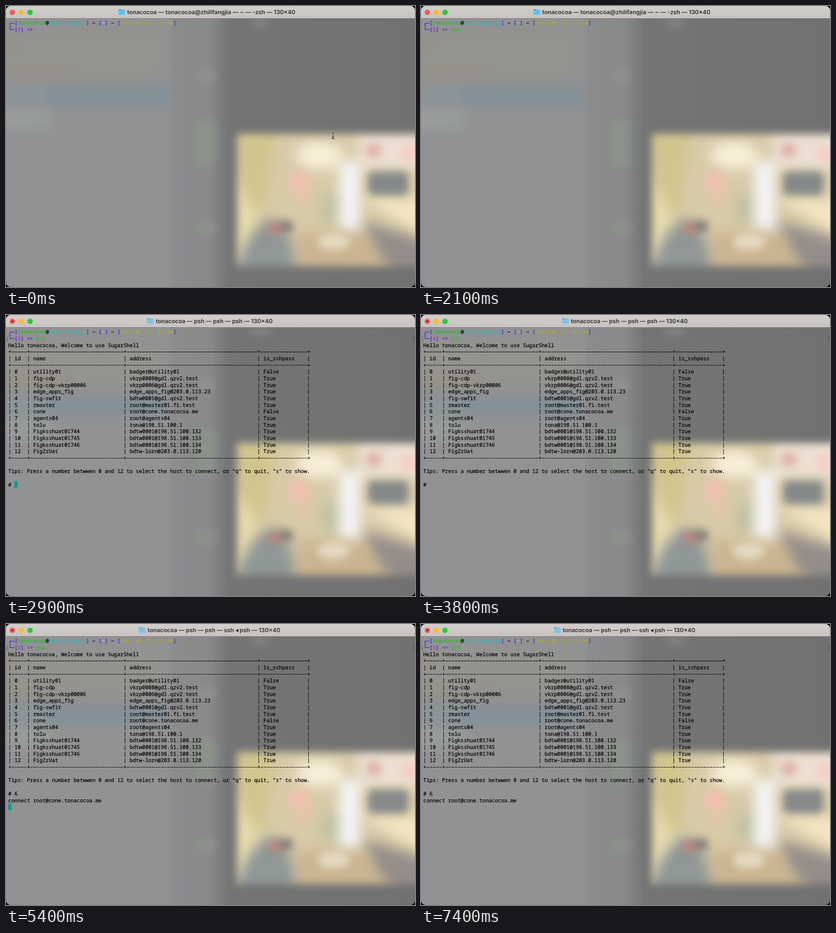
Write an HTML page that moves like this. It is 901 px wide and 621 px high and loops after 8 s.

```html
<!DOCTYPE html>
<html lang="en">
<head>
<meta charset="utf-8">
<title>Terminal</title>
<style>
  html, body { margin: 0; width: 100%; height: 100%; overflow: hidden; background: #000; }
  svg { display: block; }
  text { font: 500 11.43px "Noto Sans Mono", monospace; white-space: pre; text-rendering: geometricPrecision; }
  .regular { stroke: currentColor; stroke-width: .25px; }
  .bold { font-weight: 700; }
  #title { font: 600 12.75px Inter, sans-serif; fill: #302d2c; }
  .soft { filter: url(#soft); }
  .wide { filter: url(#wide); }
</style>
</head>
<body>
<svg width="901" height="621" viewBox="0 0 901 621">
  <defs>
    <filter id="soft" x="-60%" y="-60%" width="220%" height="220%" color-interpolation-filters="sRGB"><feGaussianBlur stdDeviation="9"/></filter>
    <filter id="wide" x="-50%" y="-50%" width="200%" height="200%" color-interpolation-filters="sRGB"><feGaussianBlur stdDeviation="14"/></filter>
    <linearGradient id="desk">
      <stop offset="0" stop-color="#919294"/><stop offset=".395" stop-color="#919294"/>
      <stop offset=".41" stop-color="#8b8c8e"/><stop offset=".5" stop-color="#88898a"/>
      <stop offset=".545" stop-color="#747474"/><stop offset="1" stop-color="#717171"/>
    </linearGradient>
    <linearGradient id="bar" x2="0" y2="1"><stop stop-color="#d3cecc"/><stop offset="1" stop-color="#c8c3c1"/></linearGradient>
    <clipPath id="window"><rect width="901" height="621" rx="10"/></clipPath>
    <mask id="photo" maskUnits="userSpaceOnUse" x="440" y="220" width="500" height="401">
      <rect class="soft" x="509" y="283" width="450" height="292" fill="#fff"/>
    </mask>
  </defs>
  <g clip-path="url(#window)">
    <rect width="901" height="621" fill="url(#desk)"/>
    <g class="wide">
      <rect x="-30" y="50" width="380" height="115" fill="#949390"/>
      <ellipse cx="0" cy="86" rx="24" ry="12" fill="#9a9087"/>
      <ellipse cx="50" cy="143" rx="105" ry="13" fill="#979289"/>
      <rect x="-30" y="225" width="130" height="48" fill="#999c9b"/>
    </g>
    <g class="soft">
      <rect x="-20" y="181" width="376" height="38" fill="#839098"/>
      <rect x="-20" y="184" width="110" height="34" fill="#8c9599"/>
      <rect x="416" y="252" width="42" height="104" fill="#8c9289"/>
      <ellipse cx="438" cy="490" rx="24" ry="20" fill="#8c908a"/>
      <ellipse cx="440" cy="155" rx="20" ry="14" fill="#909193"/>
      <ellipse cx="560" cy="36" rx="24" ry="12" fill="#828282"/>
    </g>
    <g mask="url(#photo)">
      <rect x="440" y="220" width="500" height="401" fill="#d8cba8"/>
      <g class="wide">
        <path d="M500 270h95l-25 180-40 40z" fill="#d1c58e"/>
        <path d="M490 360l65 100-25 90h-40z" fill="#e6daad"/>
        <ellipse cx="690" cy="330" rx="52" ry="30" fill="#f8efd9"/>
        <path d="M775 270h160v90h-160z" fill="#ece0d2"/>
        <path d="M785 425h150v90z" fill="#f3e5c2"/>
        <path d="M785 475l150 45v110h-70z" fill="#958d8a"/>
        <path d="M640 500h150l90 130h-240z" fill="#cbb591"/>
        <ellipse cx="714" cy="448" rx="19" ry="36" fill="#bfc0a0"/>
        <path d="M500 630q20-145 90-160 48 20 50 160z" fill="#8f9797"/>
        <rect x="734" y="344" width="46" height="150" fill="#f4f4f6"/>
      </g>
      <g class="soft">
        <ellipse cx="646" cy="388" rx="22" ry="24" fill="#efc0b0"/>
        <ellipse cx="656" cy="424" rx="14" ry="20" fill="#e6c3ac"/>
        <ellipse cx="810" cy="319" rx="18" ry="17" fill="#dfb3ac"/>
        <ellipse cx="890" cy="326" rx="20" ry="18" fill="#f6cdc6"/>
        <rect x="798" y="366" width="88" height="52" rx="12" fill="#858989"/>
        <ellipse cx="722" cy="521" rx="36" ry="19" fill="#e4dac1"/>
        <ellipse cx="592" cy="492" rx="14" ry="14" fill="#c0867c"/>
        <ellipse cx="617" cy="487" rx="16" ry="13" fill="#817c76"/>
      </g>
    </g>

    <rect width="901" height="27" fill="url(#bar)"/>
    <rect y="27" width="901" height="1" fill="#7d7b7a"/>
    <circle cx="14" cy="14" r="6" fill="#ee5e56"/>
    <circle cx="33.5" cy="14" r="6" fill="#f5bd2e"/>
    <circle cx="53" cy="14" r="6" fill="#2bc73f"/>
    <circle data-from="2900" cx="14" cy="14" r="2" fill="#7a1310"/>
    <g id="folder">
      <path d="M0 2.5q0-2 2-2h3.500l1.500 1.500h6q2 0 2 2v7.500q0 2-2 2h-11q-2 0-2-2z" fill="#3ba7dc"/>
      <rect y="3.500" width="15" height="10" rx="1.500" fill="#6cc6f2"/>
      <path d="M5.500 10.500v-2.500l2-1.700 2 1.700v2.500" fill="none" stroke="#3592c4"/>
    </g>
    <text id="title" y="18"></text>

    <rect id="cursor" width="6.9" height="14.7" fill="#079b93"/>
    <path d="M18.700 38H9V52H18.700" fill="none" stroke="#4a2cd6" stroke-width="1.500"/>
    <g id="screen"></g>
    <g data-to="1200" fill="none">
      <path id="beam" d="M717 279.500q3 0 3.500 2 .5-2 3.500-2m-3.500 2v10m-3.500 2q3 0 3.500-2 .5 2 3.500 2m-5.500-5h4" stroke="#ddd" stroke-width="2.600"/>
      <use href="#beam"/>
      <path d="M717 279.500q3 0 3.500 2 .5-2 3.500-2m-3.500 2v10m-3.500 2q3 0 3.500-2 .5 2 3.500 2m-5.500-5h4" stroke="#111" stroke-width="1.200"/>
    </g>
  </g>
</svg>
<script>
const LOOP = 8000, CELL = 6.858, LINE = 14.68;
const colX = col => 5.1 + col * CELL;
const rowY = row => 37.2 + row * LINE;
const byId = id => document.getElementById(id);
const screen = byId('screen');

function add(tag, attrs, from = 0, to = LOOP) {
  const el = document.createElementNS('http://www.w3.org/2000/svg', tag);
  for (const key in attrs) el.setAttribute(key, attrs[key]);
  el.dataset.from = from;
  el.dataset.to = to;
  return screen.appendChild(el);
}

function print(col, row, text, from, to, fill = '#000', bold = false) {
  const attrs = { x: colX(col), y: rowY(row) + 4, fill, color: fill, class: bold ? 'bold' : 'regular' };
  add('text', attrs, from, to).textContent = text;
}

function dashes(col, row, count, from, weight = 1.1) {
  add('path', {
    d: `M${colX(col) + 0.6} ${rowY(row) + 0.4}h${count * CELL - 1.2}`,
    stroke: '#000', 'stroke-width': weight, 'stroke-dasharray': `${CELL - 1.2} 1.2`
  }, from);
}

// Prompt
const violet = '#4a2cd6', green = '#36b636', user = 'tonacocoa', host = 'zhilifangjia';
const prompt = (col, row, text, fill, bold = true) => print(col, row, text, 0, LOOP, fill, bold);
prompt(2, 0, '[', violet);
prompt(3, 0, user, green);
prompt(12, 0, '@', '#000');
prompt(13, 0, host, '#3bb0ba', false);
prompt(25, 0, ']', violet);
dashes(27, 0, 1, 0, 1.3);
prompt(29, 0, '[', violet);
prompt(30, 0, '~', '#d4d2dc');
prompt(31, 0, ']', violet);
dashes(33, 0, 1, 0, 1.3);
prompt(35, 0, '[', violet);
prompt(36, 0, 'Tue Feb 15, 21:40', '#b1aa34', false);
prompt(53, 0, ']', violet);
prompt(2, 1, '[', violet);
prompt(3, 1, '$', '#b23ac6');
prompt(4, 1, ']', violet);
prompt(6, 1, '<>', violet);

// Typed command
print(9, 1, 'p', 1200, 1300, '#c2301e', true);
print(9, 1, 'ps', 1300, 1500, '#c2301e', true);
print(9, 1, 'psh', 1500, LOOP, green);
print(-0.8, 1, '[', 2500, LOOP, '#626262');
print(129.8, 1, ']', 2500, LOOP, '#4c4c4c');

// Host table
const SHOWN = 2900;
const hosts = [
  ['utility01', 'badger@utility01', 'False'],
  ['fig-cdp', 'vkrp0008@gdl.qzv2.test'],
  ['fig-cdp-vkrp00006', 'vkrp0006@gdl.qzv2.test'],
  ['edge_apps_fig', 'edge_apps_fig@203.0.113.23'],
  ['fig-swfit', 'bdtw0001@gdl.qzv2.test'],
  ['rmaster', 'root@master01.fi.test'],
  ['cone', `root@cone.${user}.me`, 'False'],
  ['agents04', 'root@agents04'],
  ['tolu', 'tona@198.51.100.1'],
  ['Figksshuat01744', 'bdtw0001@198.51.100.132'],
  ['Figksshuat01745', 'bdtw0001@198.51.100.133'],
  ['Figksshuat01746', 'bdtw0001@198.51.100.134'],
  ['FigZrUat', 'bdtw-lorn@203.0.113.120']
];
const widths = [3, 28, 40, 13];
const tableRow = (row, cells) =>
  print(0, row, `| ${cells.map((cell, i) => String(cell).padEnd(widths[i])).join(' | ')} |`, SHOWN);

function border(row) {
  let col = 0;
  for (const width of widths) {
    print(col, row, '+', SHOWN);
    dashes(col + 1, row, width + 2, SHOWN);
    col += width + 3;
  }
  print(col, row, '+', SHOWN);
}

print(0, 2, `Hello ${user}, Welcome to use SugarShell`, SHOWN);
[3, 5, 19].forEach(border);
tableRow(4, ['id', 'name', 'address', 'is_sshpass']);
hosts.forEach(([name, address, pass = 'True'], id) => tableRow(6 + id, [id, name, address, pass]));
print(0, 21, 'Tips: Press a number betwwen 0 and 12 to select the host to connect, or "q" to quit, "s" to show.', SHOWN);
print(0, 23, '#', SHOWN);
print(2, 23, '6', 5000);
print(0, 24, `connect ${hosts[6][1]}`, 5300);

// [time, text x, text, folder opacity]
const titles = [
  [0, 267, `${user} — ${user}@${host} — ~ — -zsh — 130×40`, 1],
  [2600, 328, `${user} — psh — psh — -zsh — 130×40`, 1],
  [2900, 330, `${user} — psh — psh — psh — 130×40`, 0.7],
  [5400, 312, `${user} — psh — psh — ssh ◂ psh — 130×40`, 0.7]
];
// [time, column, row]; no cell means hidden
const cursorSteps = [
  [0], [300, 9, 1], [800], [1200, 10, 1], [1300, 11, 1], [1500], [2300, 12, 1], [2500, 0, 2],
  [2900, 2, 23], [3800], [4300, 2, 23], [4800], [5000, 3, 23], [5300, 0, 25], [6400], [7300, 0, 25], [7400]
];
const timed = document.querySelectorAll('[data-from], [data-to]');
const current = (steps, t) => steps.findLast(step => step[0] <= t);
const show = (el, on) => el.setAttribute('visibility', on ? 'visible' : 'hidden');

function render(t) {
  for (const el of timed) show(el, t >= (el.dataset.from || 0) && t < (el.dataset.to || LOOP));

  const [, x, text, opacity] = current(titles, t);
  const title = byId('title');
  if (title.textContent !== text) title.textContent = text;
  title.setAttribute('x', x);
  byId('folder').setAttribute('transform', `translate(${x - 19.5} 6.500)`);
  byId('folder').setAttribute('opacity', opacity);

  const [, col, row] = current(cursorSteps, t);
  const cursor = byId('cursor');
  show(cursor, col !== undefined);
  if (col !== undefined) {
    cursor.setAttribute('x', colX(col) - 0.2);
    cursor.setAttribute('y', rowY(row) - 7.6);
  }
}

const start = performance.now();
function tick() {
  render((performance.now() - start) % LOOP);
  requestAnimationFrame(tick);
}
render(0);
requestAnimationFrame(tick);
</script>
</body>
</html>
```
